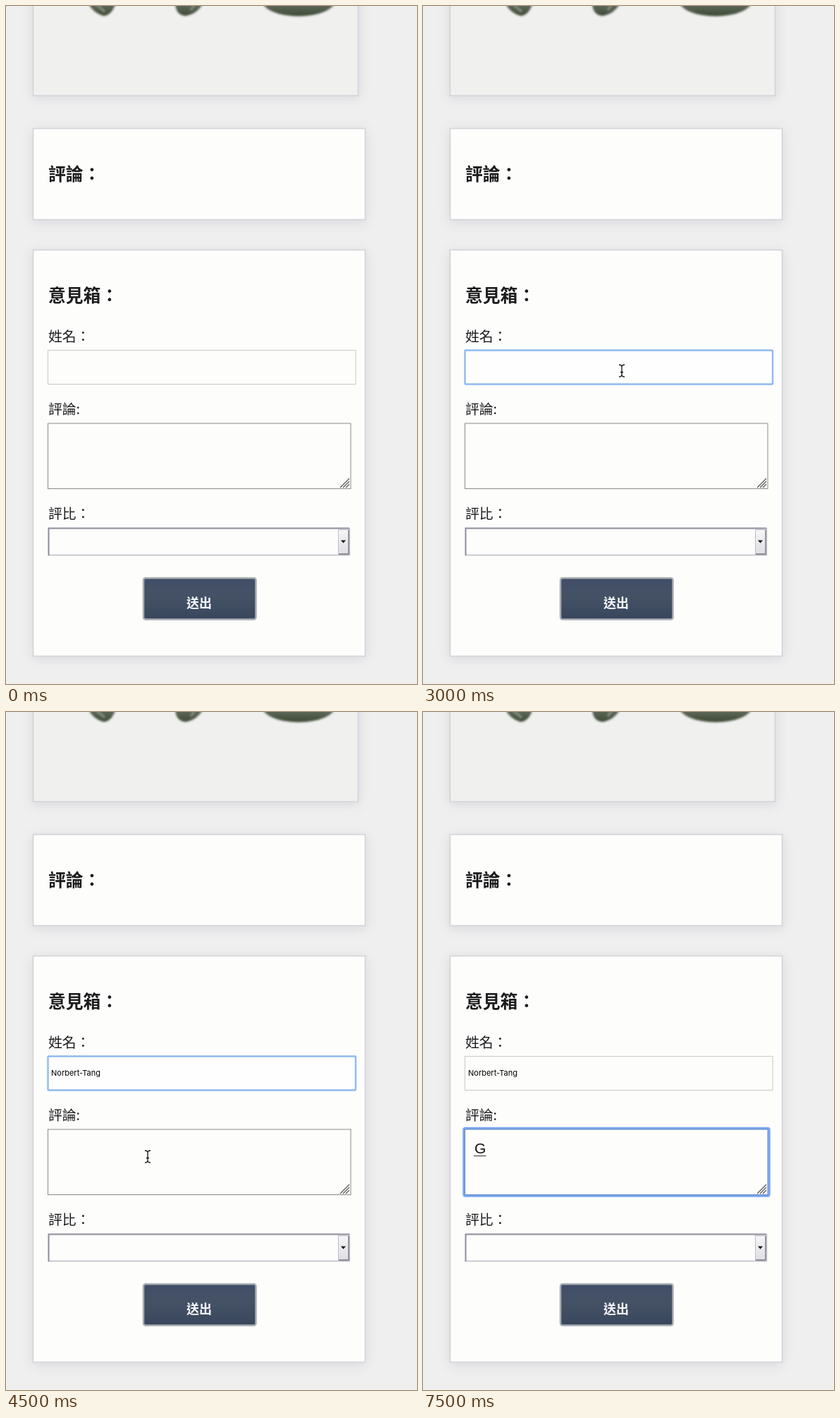
Animation of 583x960 px, one loop 8000 ms. Source, as an HTML page:

```html
<!DOCTYPE html>
<html lang="zh-Hant">
<head>
<meta charset="utf-8">
<title>意見箱</title>
<style>
  html, body { margin: 0; width: 100%; height: 100%; overflow: hidden; background: #efefef; }
  svg { display: block; width: 583px; height: 960px; }
  text { font-family: "Noto Sans CJK TC", "Noto Sans CJK", sans-serif; fill: #1c1c1e; }
  .head { font-size: 24.8px; font-weight: 700; }
  .label { font-size: 19.8px; font-weight: 500; }
  .ui { font-family: Inter, Roboto, sans-serif; fill: #000; }
  .row { font-size: 12px; font-weight: 500; }
  .panel { fill: #fdfdfc; stroke: #d3d3d8; stroke-width: 1.5; filter: drop-shadow(0 3px 8px rgba(60, 60, 110, .12)); }
  .menu { filter: drop-shadow(0 3px 5px rgba(40, 40, 70, .3)); }
</style>
</head>
<body>
<svg viewBox="0 0 583 960">
  <defs>
    <linearGradient id="btn" x2="0" y2="1">
      <stop offset="0" stop-color="#414e68"/>
      <stop offset=".45" stop-color="#455265"/>
      <stop offset="1" stop-color="#38465c"/>
    </linearGradient>
    <linearGradient id="knob" x2="0" y2="1">
      <stop offset="0" stop-color="#f6f6f8"/>
      <stop offset="1" stop-color="#dedee4"/>
    </linearGradient>
    <linearGradient id="leaf" gradientUnits="userSpaceOnUse" x1="0" y1="0" x2="0" y2="14">
      <stop offset="0" stop-color="#5c6656"/>
      <stop offset="1" stop-color="#3c4a35"/>
    </linearGradient>
    <filter id="soft" x="-20%" y="-50%" width="140%" height="200%">
      <feGaussianBlur stdDeviation="1.6"/>
    </filter>
  </defs>
  <rect width="583" height="960" fill="#efefef"/>

  <!-- picture card -->
  <rect class="panel" x="38.5" y="-20" width="461" height="147" style="fill:#f0f0ef"/>
  <g filter="url(#soft)" fill="url(#leaf)">
    <path d="M115-8 Q121 9 138 14 Q151 14 157-8Z"/>
    <path d="M240-8 Q239 13 255 14 Q273 11 282-8Z"/>
    <ellipse cx="415" cy="-8" rx="52" ry="22.5"/>
    <path d="M127-3 L140 8M262 6 L268-2" stroke="#8b9585" stroke-width="2.5"/>
  </g>

  <rect class="panel" x="38.5" y="173.5" width="471" height="129"/>
  <text class="head" x="60" y="247">評論：</text>

  <rect class="panel" x="38.5" y="345.5" width="471" height="575"/>
  <text class="head" x="60" y="418.5">意見箱：</text>

  <text class="label" x="60" y="475">姓名：</text>
  <rect x="59.5" y="487.5" width="436.5" height="48" fill="#fdfdfc" stroke="#c9cac2"/>
  <rect id="nameRing" x="59.5" y="487.5" width="436.5" height="48" rx="1" fill="#fefefe" stroke="#8ebaf0" stroke-width="2.4"/>
  <path id="nameCaret" d="M63.5 503V520" stroke="#222"/>
  <text id="name" class="ui" x="64" y="515" font-size="11"></text>

  <text class="label" x="60" y="578">評論:</text>
  <rect id="noteRing" x="58" y="589.5" width="433" height="95.5" rx="2" fill="none" stroke="#77a6f2" stroke-width="3.4"/>
  <rect id="noteBox" x="59.5" y="591" width="429.5" height="92.5" fill="#fdfdfc" stroke="#8b8d82"/>
  <path d="M474 682L487 669M478 682L487 673M482 682L487 677" stroke="#555" stroke-width="1.2" fill="none"/>
  <path id="noteCaret" d="M71 602V623" stroke="#222" stroke-width="1.4"/>
  <g id="note">
    <text x="73" y="625" font-size="21" style="font-family:'Liberation Sans',Arial,sans-serif;fill:#111">G</text>
    <path d="M72 628.5H89.5" stroke="#555" stroke-width="1.3"/>
  </g>

  <text class="label" x="60" y="726">評比：</text>
  <rect x="60" y="738.5" width="428" height="39.5" fill="#fdfdfc"/>
  <path d="M60 777.5H487.5V739" stroke="#bcbcc4" stroke-width="1.3" fill="none"/>
  <path d="M60.5 778V739.5H487" stroke="#8c8c9c" stroke-width="2" fill="none"/>
  <rect x="471.5" y="741.5" width="14.5" height="34.5" fill="url(#knob)" stroke="#bdbdc6"/>
  <path d="M472 776H486V742" stroke="#777783" stroke-width="1.3" fill="none"/>
  <path d="M475 756.5H482L478.5 760.5Z" fill="#111"/>

  <rect x="195" y="810" width="159.5" height="58.5" rx="3" fill="url(#btn)" stroke="#a9adb2" stroke-width="2.5"/>
  <text x="256" y="851.5" font-size="18" font-weight="700" style="fill:#f6f7f9">送出</text>

  <g id="menu">
    <rect class="menu" x="59" y="535" width="437" height="41" fill="#fefefe"/>
    <rect id="pick" x="59" y="535" width="437" height="20.5" fill="#2c59dc"/>
    <text id="first" class="ui row" x="64.5" y="550.5">Norbert-Tang</text>
    <text class="ui row" x="64.5" y="570.5">sadfsadfsa</text>
  </g>

  <path id="beam" fill="none" stroke="#111" stroke-width="1.3"
    d="M-4-8.5Q0-8.5 0-5.5Q0-8.5 4-8.5M0-6V6M-4 8.5Q0 8.5 0 5.5Q0 8.5 4 8.5M-2 2H2"/>
  <path id="arrow" d="M0 0V15L3.5 11.8L6 17.5L8.6 16.3L6.2 10.9H11Z" fill="#000" stroke="#fff" stroke-width="1.2"/>
</svg>
<script>
  const LOOP = 8000;
  const el = id => document.getElementById(id);
  const show = (id, on) => el(id).style.display = on ? '' : 'none';

  // Each step holds until the next; its values add to the earlier ones.
  const steps = [
    { t: 0 },
    { t: 1500, arrow: [297, 539] },
    { t: 2000, arrow: null, beam: [282, 515.5] },
    { t: 2500, nameRing: 1, nameCaret: 1 },
    { t: 3000, nameCaret: 0, beam: [282, 516.5] },
    { t: 3500, menu: 1 },
    { t: 4000, pick: 1, beam: null, arrow: [263, 541] },
    { t: 4500, menu: 0, pick: 0, name: 1, arrow: null, beam: [201, 629.5] },
    { t: 5000, nameRing: 0, noteRing: 1, noteCaret: 1, beam: [200, 632.5] },
    { t: 5500, noteCaret: 0 },
    { t: 6000, noteCaret: 1 },
    { t: 6500, noteCaret: 0 },
    { t: 7000, noteCaret: 1 },
    { t: 7500, noteCaret: 0, note: 1, beam: null }
  ];
  const parts = ['nameRing', 'nameCaret', 'noteRing', 'noteCaret', 'note', 'menu', 'pick'];

  function draw(time) {
    const state = Object.assign({}, ...steps.filter(s => s.t <= time));
    parts.forEach(id => show(id, state[id]));
    ['arrow', 'beam'].forEach(id => {
      show(id, state[id]);
      if (state[id]) el(id).setAttribute('transform', `translate(${state[id]})`);
    });
    el('name').textContent = state.name ? 'Norbert-Tang' : '';
    el('first').style.fill = state.pick ? '#fff' : '#000';
    el('noteBox').setAttribute('stroke', state.noteRing ? '#6485c0' : '#8b8d82');
  }

  function tick() {
    draw(performance.now() % LOOP);
    requestAnimationFrame(tick);
  }
  tick();
</script>
</body>
</html>
```
